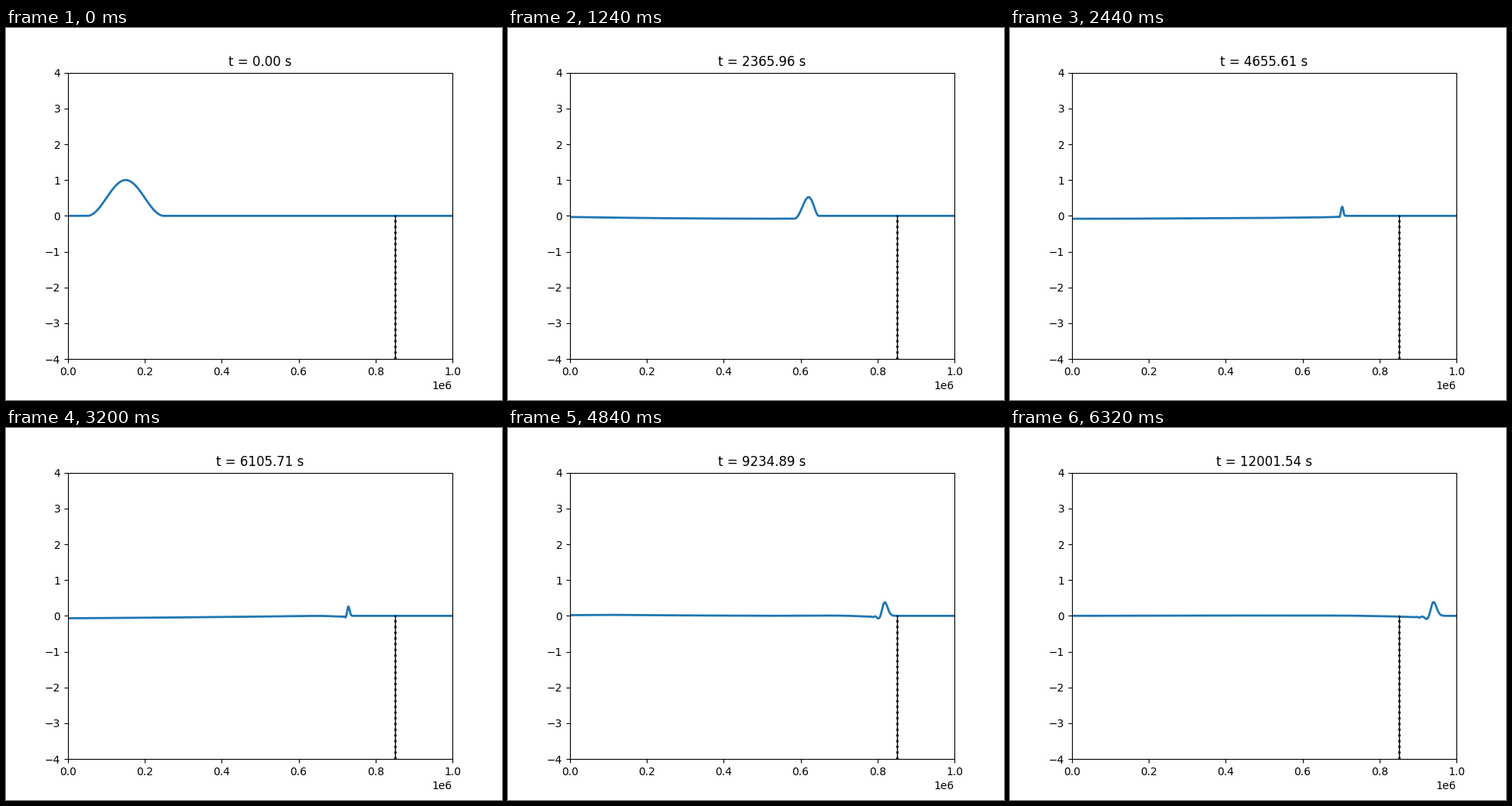
Write a matplotlib script that moves like this. It is 640 px wide and 480 px high and loops after 6360 ms.

```python
import numpy as np
import matplotlib.pyplot as plt
from matplotlib.animation import FuncAnimation

G = 9.81
H_DEEP, H_REEF, H_COAST = 7000.0, 35.0, 200.0
XA, XB, XC, XD = 300e3, 700e3, 720e3, 850e3
LENGTH, CELLS = 1e6, 1000
T_END, STRIDE = 12000.0, 20
FRAMES, INTERVAL = 159, 40


def ramp(x, x0, x1, h0, h1):
    s = np.clip((x - x0) / (x1 - x0), 0, 1)
    return h0 + (h1 - h0) * np.sin(np.pi * s / 2) ** 2


def depth(x):
    return np.where(x < XC, ramp(x, XA, XB, H_DEEP, H_REEF),
                    ramp(x, XC, XD, H_REEF, H_COAST))


def pulse(x, x1=50e3, x2=250e3):
    bump = 0.5 * (1 - np.cos(2 * np.pi * (x - x1) / (x2 - x1)))
    return np.where((x > x1) & (x < x2), bump, 0.0)


x = np.linspace(0, LENGTH, CELLS + 1)
dx = LENGTH / CELLS
u = np.sqrt(G * depth(x))
dt = dx / u.max()
steps = int(np.ceil(T_END / dt))


def solve():
    """Leapfrog f_tt = u^2 f_xx with outgoing waves at both ends."""
    c = u * dt / dx
    c2 = c[1:-1] ** 2
    old, f = pulse(x + u * dt), pulse(x)
    saved = [f]
    for n in range(1, steps + 1):
        new = np.empty_like(f)
        new[1:-1] = 2 * (1 - c2) * f[1:-1] - old[1:-1] + c2 * (f[2:] + f[:-2])
        new[0] = f[0] + c[0] * (f[1] - f[0])
        new[-1] = f[-1] - c[-1] * (f[-1] - f[-2])
        old, f = f, new
        if n % STRIDE == 0 or n == steps:
            saved.append(f)
    return saved


waves = solve()

fig, ax = plt.subplots(figsize=(6.4, 4.8), dpi=100)
ax.set_xlim(0, LENGTH)
ax.set_ylim(-4, 4)
line, = ax.plot(x, waves[0], lw=2)
ax.plot([XD, XD], [-4, 0], color="k", lw=1, zorder=3)
ax.plot([XD, XD], [-4, 0], color="k", ls=":", lw=2, zorder=3)
title = ax.set_title("t = 0.00 s")


def update(i):
    line.set_ydata(waves[i])
    title.set_text(f"t = {min(i * STRIDE, steps) * dt:.2f} s")
    return line, title


anim = FuncAnimation(fig, update, frames=FRAMES, interval=INTERVAL, repeat=True)
plt.show()
```
